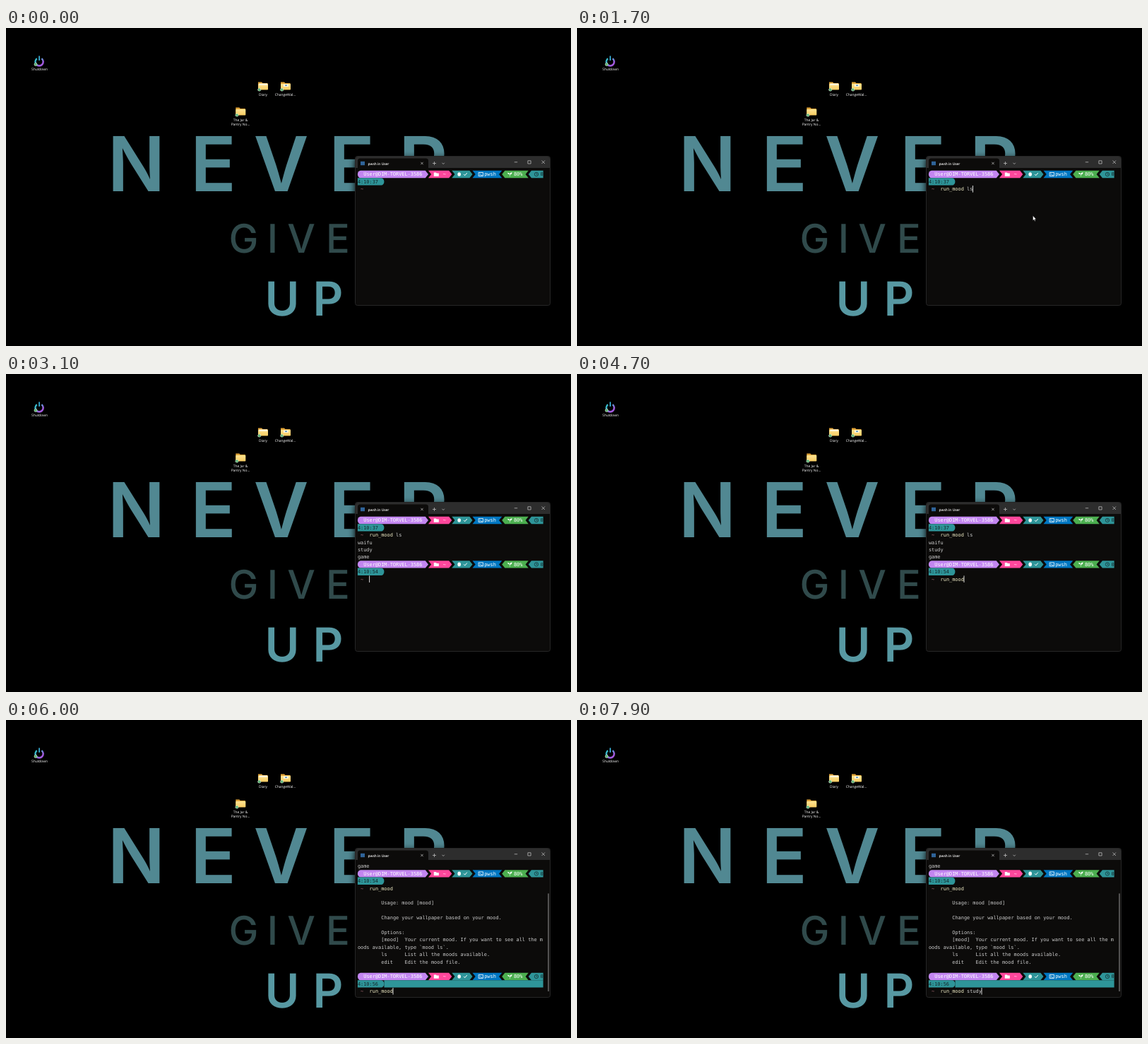
An HTML page for the animation above (8000 ms loop, 800 by 450 pixels).

```html
<!DOCTYPE html>
<html lang="en">
<head>
<meta charset="utf-8">
<title>Mood terminal</title>
<style>
  html, body { margin: 0; width: 100%; height: 100%; overflow: hidden; background: #000; }
  svg { display: block; width: 100vw; height: 100vh; }
  text { white-space: pre; text-rendering: geometricPrecision; }
  .art { font-family: Inter, sans-serif; text-anchor: middle; }
  .label { font: 4.9px "Open Sans", sans-serif; fill: #fff; text-anchor: middle; }
  .title { font: 600 4.8px "Open Sans", sans-serif; fill: #fff; }
  #window { filter: drop-shadow(0 3px 5px #000); }
  #term text { font: 6.926px "DejaVu Sans Mono", monospace; fill: #ccc; }
  .line { fill: none; stroke: #ccc; stroke-width: .7; }
</style>
</head>
<body>
<svg viewBox="0 0 800 450">
  <defs>
    <linearGradient id="power" x1="0" y1="0" x2="1" y2="1">
      <stop offset=".2" stop-color="#35b8c8"/><stop offset=".75" stop-color="#a45ae0"/>
    </linearGradient>
    <linearGradient id="paper" x1="0" y1="0" x2="0" y2="1">
      <stop offset="0" stop-color="#ffe392"/><stop offset="1" stop-color="#f8cc62"/>
    </linearGradient>
    <clipPath id="body"><path d="M495 198H771V391H495Z"/></clipPath>
    <g id="badge">
      <circle r="2.3" fill="#e9f5e9"/><circle r="1.7" fill="#2d9c4a"/>
      <path d="M-1 0L-.3 .8 1 -.8" fill="none" stroke="#fff" stroke-width=".6"/>
    </g>
    <g id="folder">
      <path d="M-7 -5.5H-2L-.5 -4H6.5V5H-7Z" fill="#dfa236"/>
      <rect x="-7" y="-3" width="14" height="8.5" rx=".8" fill="url(#paper)"/>
      <use href="#badge" x="-5.3" y="5.2"/>
    </g>
  </defs>

  <rect width="800" height="450" fill="#000"/>
  <g id="wallpaper"></g>

  <g id="desktop">
    <path d="M43.8 43.3A5.6 5.6 0 1 0 50.4 43.3" fill="none" stroke="url(#power)" stroke-width="2.5"/>
    <path d="M47.1 39.5V46" stroke="#35a9cf" stroke-width="1.8"/>
    <use href="#badge" x="42" y="51.5"/>
    <use href="#folder" x="364" y="82"/>
    <path d="M358.5 78.5H370V81H358.5Z" fill="#fff7dd"/>
    <use href="#folder" x="396" y="82"/>
    <path d="M393 79.5H400V83H393Z" fill="#fff7dd"/><path d="M395 80.5H398V82H395Z" fill="#4a90c0"/>
    <use href="#folder" x="332.3" y="118"/>
    <text class="label" x="47.5" y="59.8">Shutdown</text>
    <text class="label" x="364" y="95.8">Diary</text>
    <text class="label" x="395.5" y="95.8">ChangeWal...</text>
    <text class="label" x="332" y="131.8">The Jar &amp;</text>
    <text class="label" x="332" y="138">Pantry No...</text>
  </g>

  <g id="window">
    <rect x="494.5" y="181.5" width="276" height="211" rx="3" fill="#0c0b0a" stroke="#262626"/>
    <path d="M495 198V185Q495 182 498 182H767Q770 182 770 185V198Z" fill="#2d2d2d"/>
    <path d="M498 198V188Q498 184.500 501.500 184.500H594.500Q598 184.500 598 188V198Z" fill="#0c0b0a"/>
    <rect x="502" y="188.800" width="6" height="5.400" fill="#2f6399"/>
    <text class="title" x="512.6" y="193.5">pwsh in User</text>
    <path class="line" d="M587.300 189.800L590.700 193.200M590.700 189.800L587.300 193.200M604 191.500H609M606.500 189V194M617.500 190.800L619.200 192.500 620.900 190.800M719.800 189.800H724.200M738.900 187.800H743.100V192H738.900ZM758.500 187.500L763 192M763 187.500L758.500 192"/>
  </g>
  <g id="term" clip-path="url(#body)"></g>
  <path id="mouse" d="M645.500 265.500V272.500L647.100 271.100 648.200 273.600 649.200 273.100 648.200 270.800H650.200Z" fill="#fff" stroke="#000" stroke-width=".4"/>
</svg>
<script>
const LOOP = 8000, CELL = 4.17, ROW = 10.4, LEFT = 497.9, TOP = 201.8;
const TEAL = '#2e9599', DARK = '#15292b', TILDE = '#b8737f';
const HOST = 'User@DIM-TORVEL-3586';
const colX = c => LEFT + c * CELL;
const rowY = r => TOP + r * ROW;

const words = [
  { size: 107.3, weight: 600, y: 231, fill: '#518892', letters: [['N', 184.5], ['E', 293.5], ['V', 389.5], ['E', 489.5], ['R', 591]] },
  { size: 56, weight: 550, y: 317.5, fill: '#304a4b', letters: [['G', 336.5], ['I', 377.5], ['V', 418], ['E', 470]] },
  { size: 66.5, weight: 600, y: 407, fill: '#5798a2', letters: [['U', 391], ['P', 456]] }
];
document.getElementById('wallpaper').innerHTML = words.map(w =>
  `<text class="art" y="${w.y}" font-size="${w.size}" font-weight="${w.weight}" fill="${w.fill}">` +
  w.letters.map(([ch, x]) => `<tspan x="${x}">${ch}</tspan>`).join('') + '</text>').join('');

const write = (row, col, str, fill = '#ccc') =>
  `<text x="${colX(col)}" y="${rowY(row) + 7.6}" style="fill:${fill}">${str}</text>`;
const icon = (row, x, d, attrs) =>
  `<path transform="translate(${x} ${rowY(row) + 5.2})" d="${d}" ${attrs}/>`;
const stroke = (color, width = .8) => `fill="none" stroke="${color}" stroke-width="${width}"`;

// A prompt segment; each end is flat, round, tip (pointing out) or notch (cut in).
function segment(row, from, to, left, right, fill) {
  const a = colX(from), b = colX(to), y = rowY(row), m = y + ROW / 2, z = y + ROW, d = CELL;
  const ends = (edge, dir, start, stop) => ({
    flat: `L${edge} ${start}L${edge} ${stop}`,
    round: `L${edge - dir * d} ${start}A${d} ${ROW / 2} 0 0 1 ${edge - dir * d} ${stop}`,
    tip: `L${edge - dir * d} ${start}L${edge} ${m}L${edge - dir * d} ${stop}`,
    notch: `L${edge} ${start}L${edge - dir * d} ${m}L${edge} ${stop}`
  });
  return `<path fill="${fill}" d="M${(a + b) / 2} ${y}${ends(b, 1, y, z)[right]}${ends(a, -1, z, y)[left]}Z"/>`;
}

function prompt(row, seconds, filled) {
  return segment(row, 0, 24, 'round', 'tip', '#c386f1') + write(row, 2, HOST, '#fff') +
    segment(row, 24, 32, 'notch', 'tip', '#ff479c') + write(row, 29, '~', '#fff') +
    icon(row, 609.3, 'M-3.500 -2.500H-.5L.5 -1.500H3.500V2.700H-3.500Z', 'fill="#fff"') +
    segment(row, 32, 39, 'notch', 'tip', TEAL) +
    icon(row, 641.7, 'M-2.300 0A2.300 2.800 0 1 1 2.300 0A2.300 2.800 0 1 1 -2.300 0Z', 'fill="#fff"') +
    icon(row, 650.5, 'M-2.300 0L-.8 1.700 2.300 -1.900', stroke('#fff', 1)) +
    segment(row, 39, 49, 'notch', 'notch', '#0077c2') + write(row, 43, 'pwsh', '#fff') +
    icon(row, 672.3, 'M-3.200 -2.500H3.200V2.500H-3.200ZM-2 -1.200L-.7 0 -2 1.200M0 1.200H2', stroke('#fff')) +
    segment(row, 49, 58, 'tip', 'notch', '#4caf50') + write(row, 53, '80%', '#fff') +
    icon(row, 713.3, 'M0 3V0Q-3 0 -3.200 -2.300Q-.5 -2.300 0 0Q.5 -2.800 3.300 -2.800Q3 .3 .5 .5V3Z', 'fill="#fff"') +
    segment(row, 58, 63, 'tip', 'flat', TEAL) + write(row, 62, '0', DARK) +
    icon(row, 751, 'M-2.700 0A2.700 2.700 0 1 1 2.700 0A2.700 2.700 0 1 1 -2.700 0ZM0 -1.600V.2H1.300', stroke(DARK, .7)) +
    (filled ? segment(row + 1, 9, 63, 'flat', 'flat', TEAL) : '') +
    segment(row + 1, 0, 9, 'flat', 'round', TEAL) + write(row + 1, 0, '4:10:' + seconds, DARK) +
    write(row + 2, 1, '~', TILDE);
}

const cursor = (row, col) =>
  `<rect x="${colX(col) - .4}" y="${rowY(row) + .4}" width=".9" height="9.6" fill="#eee"/>`;
const command = (row, str) =>
  write(row, 4, str.slice(0, 8), '#f4f0c8') + write(row, 12, str.slice(8), '#d0d0d0');
const input = (row, str) => command(row, str) + cursor(row, 4 + str.length);

const every = (start, step) => Array.from({ length: 8 }, (_, i) => start + i * step);
const typed = (str, times, t) => str.slice(0, times.filter(at => at <= t).length);

const LS = [...every(100, 100), 1200, 1400, 1600];
const HELP = every(3400, 150);
const STUDY = [...every(5200, 100), 6900, 7000, 7200, 7300, 7500, 7700];

const usage = [
  [5, 8, 'Usage: mood [mood]'],
  [7, 8, 'Change your wallpaper based on your mood.'],
  [9, 8, 'Options:'],
  [10, 8, '[mood]  Your current mood. If you want to see all the m'],
  [11, 0, 'oods available, type `mood ls`.'],
  [12, 8, 'ls      List all the moods available.'],
  [13, 8, 'edit    Edit the mood file.']
];

function listing(t) {
  let out = prompt(0, 37);
  if (t < 100) return out;
  if (t < 2400) return out + input(2, typed('run_mood ls', LS, t));
  out += command(2, 'run_mood ls');
  if (t < 2600) return out + cursor(3, 0);
  out += ['waifu', 'study', 'game'].map((mood, i) => write(3 + i, 0, mood)).join('');
  if (t < 2800) return out + cursor(6, 0);
  return out + prompt(6, 54) + input(8, typed('run_mood', HELP, t));
}

function help(t) {
  const barTop = t < 5000 ? 232 : 245.500;
  return write(0, 0, 'game') + prompt(1, 54) + command(3, 'run_mood') +
    usage.map(line => write(...line)).join('') +
    prompt(15, 56, true) + input(17, typed('run_mood study', STUDY, t)) +
    `<rect x="767.500" y="${barTop}" width="1" height="${384 - barTop}" fill="#9a9a9a"/>`;
}

const term = document.getElementById('term'), mouse = document.getElementById('mouse');
let shown = '';
function draw() {
  const t = performance.now() % LOOP;
  const content = t < 4800 ? listing(t) : help(t);
  if (content !== shown) term.innerHTML = shown = content;
  mouse.style.display = t >= 100 && t < 2400 ? '' : 'none';
  requestAnimationFrame(draw);
}
draw();
</script>
</body>
</html>
```
